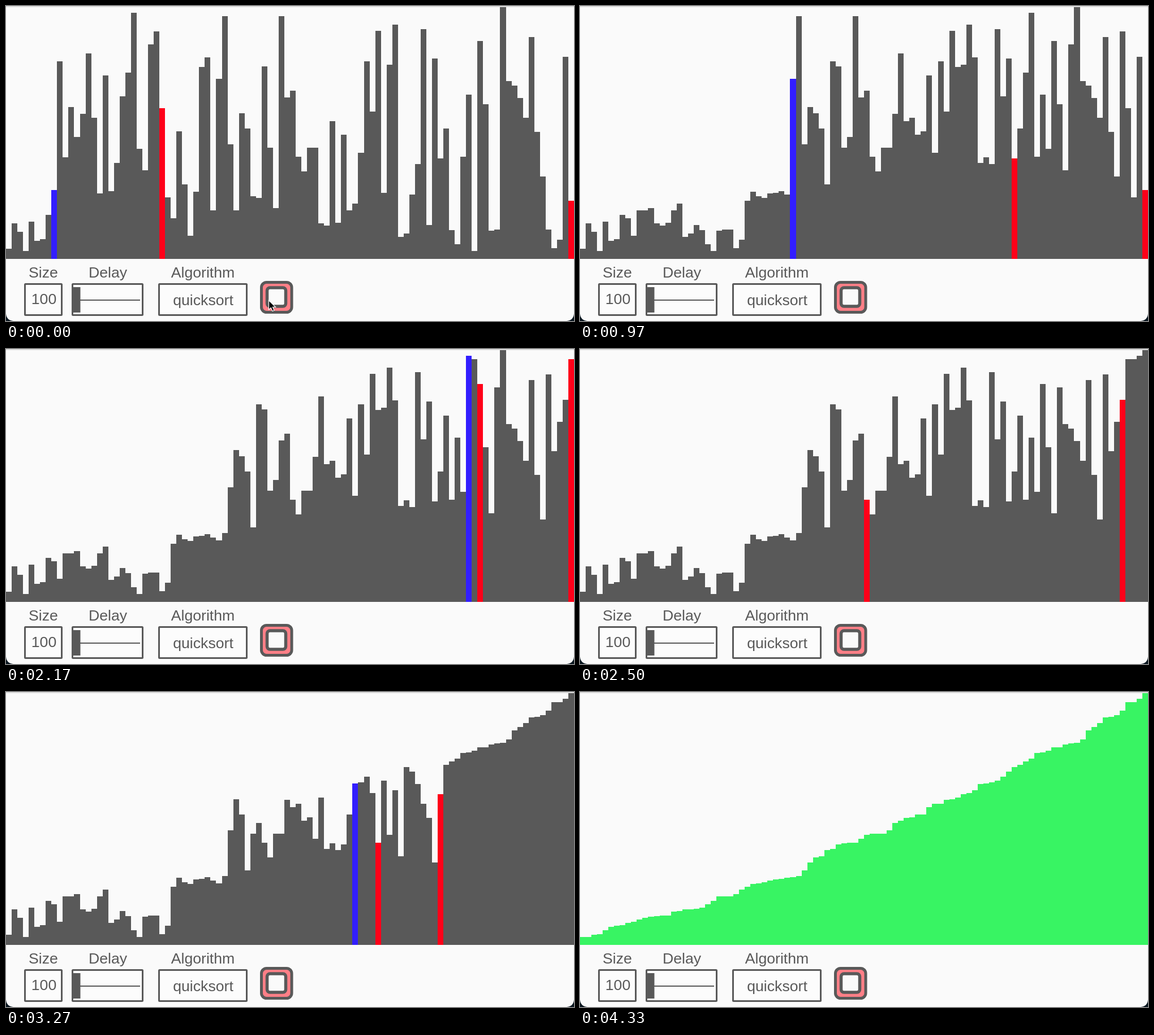
Animation of 1004x558 px, one loop 4460 ms. Source, as an HTML page:

```html
<!DOCTYPE html>
<html lang="en">
<head>
<meta charset="utf-8">
<title>Quicksort</title>
<style>
  html, body { margin: 0; width: 100%; height: 100%; overflow: hidden; background: #fafafa; }
  svg { display: block; width: 100vw; height: 100vh; }
  text { font: 26.67px "Liberation Sans", Arial, sans-serif; fill: #595959; text-anchor: middle; }
  .box { fill: #fcfcfc; stroke: #595959; stroke-width: 3; }
</style>
</head>
<body>
<svg viewBox="0 0 1004 558">
  <rect width="1004" height="558" fill="#0b1720"/>
  <path d="M0 0H1004V545Q1003 557 991 558H13Q1 557 0 545Z" fill="#fafafa"/>
  <rect width="1004" height="2" fill="#dcdcdc"/>
  <g id="bars" shape-rendering="crispEdges"></g>

  <text x="66" y="481">Size</text>
  <text x="180" y="481">Delay</text>
  <text x="348" y="481">Algorithm</text>
  <rect class="box" x="33.5" y="492.5" width="65" height="55" rx="1"/>
  <text x="67" y="528">100</text>
  <rect class="box" x="117.5" y="492.5" width="124" height="55" rx="1"/>
  <rect x="131" y="520" width="106" height="2" fill="#595959"/>
  <rect x="118" y="498" width="13.5" height="45" fill="#595959"/>
  <rect class="box" x="270.5" y="492.5" width="155" height="55" rx="1"/>
  <text x="348.5" y="530">quicksort</text>

  <rect x="451.5" y="489.5" width="53.5" height="53" rx="9" fill="#ff7f87" stroke="#595959" stroke-width="5"/>
  <rect x="461.5" y="499" width="33" height="33" rx="5" fill="#fafafa" stroke="#595959" stroke-width="5.5"/>
  <path id="cursor" d="M0 0V16.5L3.8 13L6.5 19L9.5 17.7L6.9 11.8H12Z" fill="#000" stroke="#fff" stroke-width="1.2"/>
</svg>
<script>
const LOOP = 4460, DONE = 130, COUNT = 100, STEP = 10.04, BASE = 447.5;
const GRAY = '#595959', RED = '#ff0019', BLUE = '#321eff', GREEN = '#38f463';

// Top edge of every bar; a lower bar has a larger number.
const tops = [
  430, 385, 400, 434, 382, 416, 413, 370, 326, 98,
  268, 179, 232, 191, 84, 198, 332, 123, 328, 278,
  160, 118, 12, 253, 291, 68, 45, 181, 339, 376,
  222, 316, 407, 329, 108, 91, 362, 129, 18, 245,
  362, 190, 217, 337, 340, 107, 251, 358, 18, 162,
  150, 267, 293, 250.8, 251, 385, 389, 204, 384, 228,
  362, 350, 260, 98, 187, 44, 331, 104, 33, 409,
  403, 334, 280, 41, 388, 93, 270, 217, 397, 422,
  267, 157, 434, 62, 174, 398, 396, 2, 133, 141,
  163, 198, 55, 223, 302, 396, 429, 414, 90, 345
];

const steps = [];

function swap(a, i, j) {
  [a[i], a[j]] = [a[j], a[i]];
}

// Lomuto partition, right side first; the first pass is already under way.
function quicksort(a, lo, hi, i = lo, j = lo) {
  if (lo >= hi) return;
  for (; j < hi; j++) {
    steps.push({ a: a.slice(), lo, hi, i, j });
    if (a[j] > a[hi]) swap(a, i++, j);
  }
  swap(a, i, hi);
  quicksort(a, i + 1, hi);
  quicksort(a, lo, i - 1);
}

const sorted = tops.slice();
quicksort(sorted, 0, COUNT - 1, 8, 27);

// The sort runs unevenly: tick, then the range and scan position reached.
const pace = [
  [0, 0, 99, 27], [16, 30, 99, 53], [29, 30, 99, 76], [32, 30, 99, 81],
  [44, 39, 99, 46], [48, 39, 99, 53], [64, 39, 99, 80], [65, 39, 99, 83],
  [86, 39, 95, 84], [113, 52, 56, 54]
].map(([tick, lo, hi, j]) =>
  [tick, steps.findIndex(s => s.lo === lo && s.hi === hi && s.j === j)]);
pace.push([DONE - 1, steps.length - 1]);

function stepAt(tick) {
  const k = pace.findIndex(p => p[0] > tick);
  if (k < 0) return steps[steps.length - 1];
  const [t0, s0] = pace[k - 1], [t1, s1] = pace[k];
  return steps[Math.round(s0 + (s1 - s0) * (tick - t0) / (t1 - t0))];
}

const group = document.getElementById('bars');
const cursor = document.getElementById('cursor');
const bars = tops.map((_, n) => {
  const bar = document.createElementNS('http://www.w3.org/2000/svg', 'rect');
  bar.setAttribute('x', n * STEP);
  bar.setAttribute('width', STEP);
  return group.appendChild(bar);
});

function draw(ms) {
  const tick = Math.min(DONE, Math.floor((ms + 5) * 3 / 100));
  const done = tick === DONE;
  const s = done ? { a: sorted } : stepAt(tick);
  bars.forEach((bar, n) => {
    const color = done ? GREEN
      : n === s.j || n === s.hi ? RED
      : n === s.i ? BLUE : GRAY;
    bar.setAttribute('y', s.a[n]);
    bar.setAttribute('height', BASE - s.a[n]);
    bar.setAttribute('fill', color);
  });
  const away = Math.max(0, tick - 1) / 6;
  cursor.setAttribute('transform', `translate(${464.5 - 6 * away} ${521.5 + 40 * away * away})`);
  cursor.setAttribute('visibility', away < 1 ? 'visible' : 'hidden');
}

const start = performance.now();
function loop() {
  draw((performance.now() - start) % LOOP);
  requestAnimationFrame(loop);
}
loop();
</script>
</body>
</html>
```
